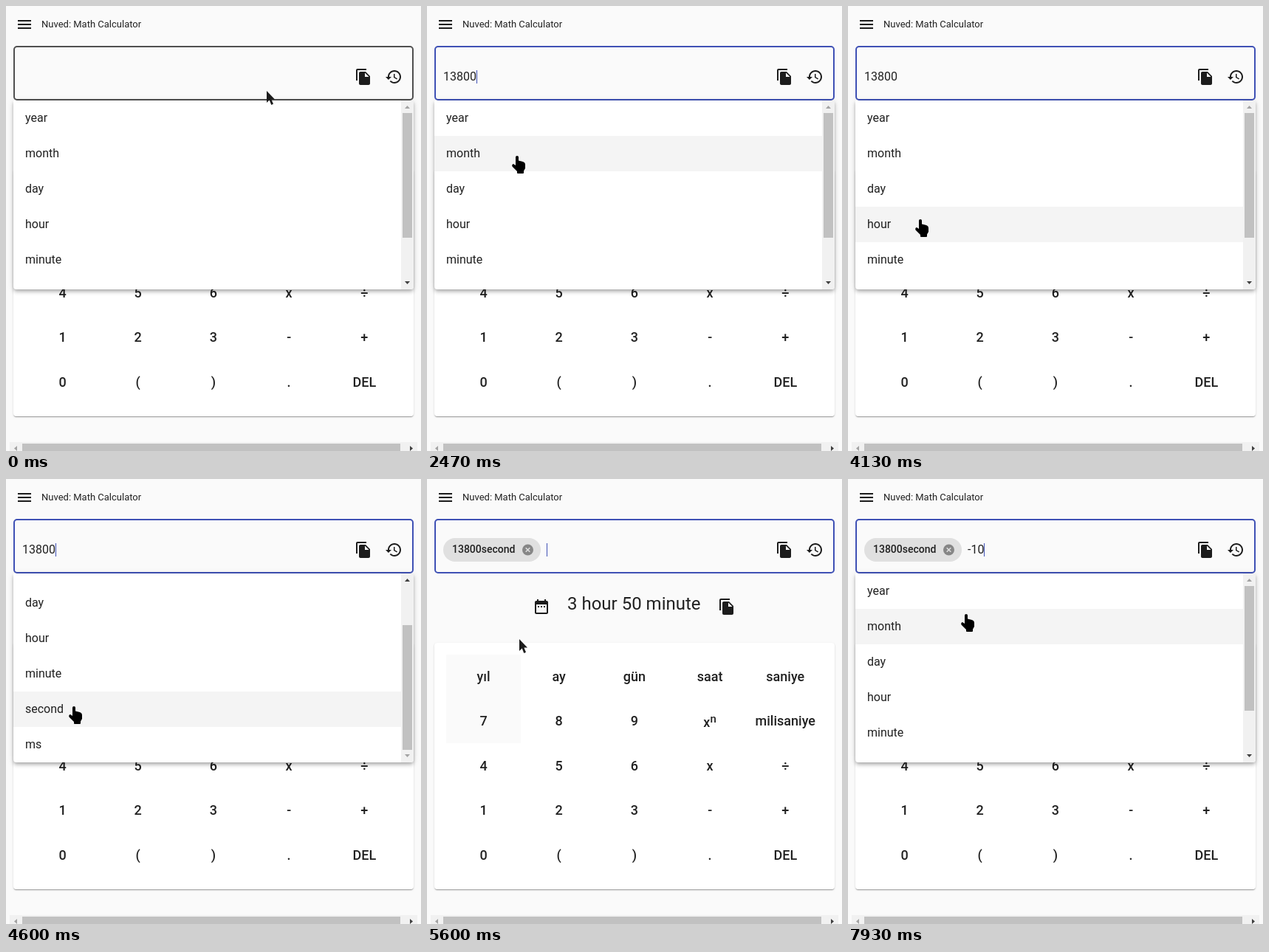
Animation, 562 px wide and 603 px high, one loop 8 s. Source, as an HTML page:

```html
<!DOCTYPE html>
<html lang="en">
<head>
<meta charset="utf-8">
<title>Calculator</title>
<style>
  html, body { margin: 0; width: 100%; height: 100%; overflow: hidden; background: #fafafa; }
  body { position: relative; }
  body > * { position: absolute; }
  .layer { left: 0; top: 0; }
  svg { display: block; }
  text { font-family: Roboto, sans-serif; font-size: 16px; fill: #212121; white-space: pre; }
  path, .ink { fill: #1c1c1c; }
  .key { font-size: 18px; font-weight: 500; text-anchor: middle; }
  #card {
    left: 10px; top: 222px; width: 542px; height: 334px; border-radius: 4px; background: #fff;
    box-shadow: 0 2px 1px -1px rgba(0,0,0,.2), 0 1px 1px rgba(0,0,0,.14), 0 1px 3px rgba(0,0,0,.12);
  }
  #panel {
    left: 10px; top: 128px; width: 542px; height: 256px; overflow: hidden; background: #fff;
    border-radius: 0 0 4px 4px;
    box-shadow: 0 2px 4px -1px rgba(0,0,0,.2), 0 4px 5px rgba(0,0,0,.14), 0 1px 10px rgba(0,0,0,.12);
  }
</style>
</head>
<body>
<div id="card"></div>

<svg class="layer" width="562" height="603">
  <defs>
    <path id="copy" d="M16 1H4c-1.1 0-2 .9-2 2v14h2V3h12V1zm-1 4l6 6v10c0 1.1-.9 2-2 2H7.99C6.89 23 6 22.1 6 21l.01-14c0-1.1.89-2 1.99-2h7zm-1 7h5.5L14 6.5V12z"/>
  </defs>
  <path d="M16 19h18v2H16zM16 24h18v2H16zM16 29h18v2H16z"/>
  <text x="48" y="29" style="font-size:13px">Nuved: Math Calculator</text>

  <rect id="field" fill="none"/>
  <use href="#copy" x="472" y="84"/>
  <path transform="translate(513 84)" d="M13 3c-4.97 0-9 4.03-9 9H1l3.89 3.89.07.14L9 12H6c0-3.87 3.13-7 7-7s7 3.13 7 7-3.13 7-7 7c-1.93 0-3.68-.79-4.94-2.06l-1.42 1.42C8.27 19.99 10.51 21 13 21c4.97 0 9-4.03 9-9s-4.03-9-9-9zm-1 5v5l4.28 2.54.72-1.21-3.5-2.08V8H12z"/>
  <g id="chip">
    <rect x="22" y="80" width="132" height="32" rx="16" fill="#e0e0e0"/>
    <text x="34" y="100" style="font-size:14px;font-weight:500">13800second</text>
    <circle cx="136.5" cy="96" r="7.5" fill="#868686"/>
    <path d="M133.7 93.2l5.6 5.6m0-5.6l-5.6 5.6" stroke="#e0e0e0" stroke-width="1.5"/>
  </g>
  <text id="typed" y="101"></text>
  <rect id="caret" y="87" width="1" height="18" fill="#3f51b5"/>

  <path transform="translate(143 161)" d="M9 11H7v2h2v-2zm4 0h-2v2h2v-2zm4 0h-2v2h2v-2zm2-7h-1V2h-2v2H8V2H6v2H5c-1.11 0-1.99.9-1.99 2L3 20c0 1.1.89 2 2 2h14c1.1 0 2-.9 2-2V6c0-1.1-.9-2-2-2zm0 16H5V9h14v11z"/>
  <text x="190" y="177" style="font-size:24px">3 hour 50 minute</text>
  <use href="#copy" x="394" y="161"/>

  <g fill="#fafafa">
    <rect id="hoverTop" x="26" y="238" width="101" height="60"/>
    <rect id="hoverLow" x="26" y="298" width="101" height="60"/>
  </g>
  <g id="keys"></g>

  <rect x="5" y="591" width="552" height="12" fill="#f1f1f1"/>
  <rect x="22" y="593" width="512" height="10" fill="#c1c1c1"/>
  <path d="M15 596v7l-4-3.5z" style="fill:#a3a3a3"/>
  <path d="M547 596v7l4-3.5z" style="fill:#404040"/>
</svg>

<div id="panel">
  <svg width="542" height="256">
    <g id="list">
      <rect id="rowHover" width="525" height="48" fill="#f4f4f4"/>
      <svg y="240" width="525" height="48">
        <circle id="ripple" cx="77" cy="31" fill="#000" fill-opacity=".1"/>
      </svg>
    </g>
    <rect x="525" width="17" height="256" fill="#f1f1f1"/>
    <rect id="thumb" x="527" width="13" height="169" fill="#c1c1c1"/>
    <path id="up" d="M530 11h7l-3.5-4z"/>
    <path id="down" d="M530 245h7l-3.5 4z"/>
  </svg>
</div>

<svg class="layer" width="562" height="603">
  <g id="cursor">
    <path id="arrow" d="M0 0V16L3.7 12.6L6.3 19L9 17.8L6.4 11.6H11Z"/>
    <path id="beam" d="M-4-9h3l1 1 1-1h3v2h-3v14h3v2h-3l-1-1-1 1h-3v-2h3v-14h-3z" style="fill:#000"/>
    <path id="hand" transform="translate(-6 0)" d="M5 1.7Q5 0 7 0T9 1.7V6.5L15 8Q18 9 18 12V17L16 20.5V23Q16 24 15 24H8Q7 24 7 23V21L.5 14.5Q-.5 11.5 2 11L5 13Z" style="fill:#000"/>
  </g>
</svg>

<script>
const LOOP = 8000;
const $ = id => document.getElementById(id);
const set = (id, attrs) => { for (const k in attrs) $(id).setAttribute(k, attrs[k]); };
const show = (id, on) => { $(id).style.display = on ? '' : 'none'; };
const clamp = v => Math.max(0, Math.min(1, v));

function addText(parent, str, x, y, cls) {
  const el = document.createElementNS('http://www.w3.org/2000/svg', 'text');
  el.setAttribute('x', x);
  el.setAttribute('y', y);
  if (cls) el.setAttribute('class', cls);
  el.textContent = str;
  $(parent).appendChild(el);
  return el;
}

const keyRows = ['yıl ay gün saat saniye', '7 8 9 xn milisaniye', '4 5 6 x ÷', '1 2 3 - +', '0 ( ) . DEL'];
keyRows.forEach((row, r) => row.split(' ').forEach((label, c) => {
  const x = 76.5 + c * 102.2, y = Math.round(274 + r * 60.4);
  if (label === 'xn') {
    addText('keys', 'x', x - 4.2, y + 2, 'key');
    addText('keys', 'n', x + 4.6, y - 4, 'key').style.fontSize = '15px';
  } else addText('keys', label, x, y, 'key');
}));

['year', 'month', 'day', 'hour', 'minute', 'second', 'ms']
  .forEach((unit, i) => addText('list', unit, 16, i * 48 + 29));

// Pointer hot spot: time, x, y
const path = [
  [0, 353, 115], [266, 219, 95], [1733, 219, 95], [2133, 121, 203],
  [3333, 121, 203], [3800, 104, 335], [4133, 97, 289], [4400, 97, 289],
  [4733, 87, 319], [5200, 87, 319], [5600, 125, 217], [5733, 160, 189],
  [5800, 160, 189], [5866, 159, 183], [LOOP, 159, 183]
];
const caretOn = [[470, 930], [1400, 1930], [2470, 3000], [3530, 4070], [4600, 5000],
  [5130, 5670], [6200, 6730], [7130, LOOP]];

function pointer(t) {
  const i = Math.max(1, path.findIndex(k => k[0] >= t));
  const [t0, x0, y0] = path[i - 1], [t1, x1, y1] = path[i];
  const p = clamp((t - t0) / (t1 - t0)), e = p * p * (3 - 2 * p);
  return [Math.round(x0 + (x1 - x0) * e), Math.round(y0 + (y1 - y0) * e)];
}

function tick(t) {
  let n = Math.floor((t + 4) * 15 / 1000);
  if (Math.round(n * 100 / 15) * 10 > t) n--;
  return n * 1000 / 15;
}

function typedText(t) {
  if (t < 1400) return '';
  if (t < 5130) return '13800';
  return t < 7130 ? '' : t < 7670 ? '-' : t < 7930 ? '-1' : '-10';
}

function drawField(t) {
  const color = t < 200 ? '#505050' : t >= 5000 && t < 5130 ? '#dadada' : '#3f51b5';
  const w = color === '#dadada' ? 1 : 2;
  set('field', { x: 10 + w / 2, y: 54 + w / 2, width: 542 - w, height: 74 - w, rx: 4,
    stroke: color, 'stroke-width': w });

  const chip = t >= 5130, str = typedText(t), x = chip ? 162 : 22;
  show('chip', chip);
  $('typed').textContent = str;
  set('typed', { x });
  const width = [...str].reduce((sum, ch) => sum + (ch === '-' ? 4.4 : 9), 0);
  set('caret', { x: Math.floor(x + width) });
  show('caret', caretOn.some(([a, b]) => t >= a && t < b));
}

function drawPanel(t, q, y) {
  const open = t < 5230 || t >= 7130;
  show('panel', open);
  $('panel').style.opacity = t < 7130 ? 1 - clamp((t - 5130) / 100) : 1;

  const s = t < 5230 ? clamp((q - 4200) / 200) : 0;
  const scroll = Math.round(80 * (1 - (1 - s) ** 2));
  set('list', { transform: `translate(0 ${-scroll})` });
  set('thumb', { y: Math.round(17 + scroll * 222 / 336) });
  $('up').style.fill = scroll > 0 ? '#404040' : '#a3a3a3';
  $('down').style.fill = scroll < 80 ? '#404040' : '#a3a3a3';

  show('rowHover', y >= 128);
  set('rowHover', { y: Math.floor((y - 128 + scroll) / 48) * 48 });
  const p = t < 5230 ? clamp((q - 5027) / 225) : 0;
  set('ripple', { r: 449 * (1 - (1 - p) ** 3.24) });
}

function drawPointer(t, x, y) {
  let kind = y >= 128 ? 'hand' : 'beam';
  if (t < 130 || (t >= 5530 && t < 5870)) kind = 'arrow';
  ['arrow', 'beam', 'hand'].forEach(k => show(k, k === kind));
  set('cursor', { transform: `translate(${x} ${y})` });
  show('hoverTop', t >= 5400 && t < 5730);
  show('hoverLow', t >= 5200 && t < 5730);
}

function draw(t) {
  const q = tick(t), [x, y] = pointer(q);
  drawField(t);
  drawPanel(t, q, y);
  drawPointer(t, x, y);
}

const start = performance.now();
function loop() {
  draw((performance.now() - start) % LOOP);
  requestAnimationFrame(loop);
}
loop();
</script>
</body>
</html>
```
